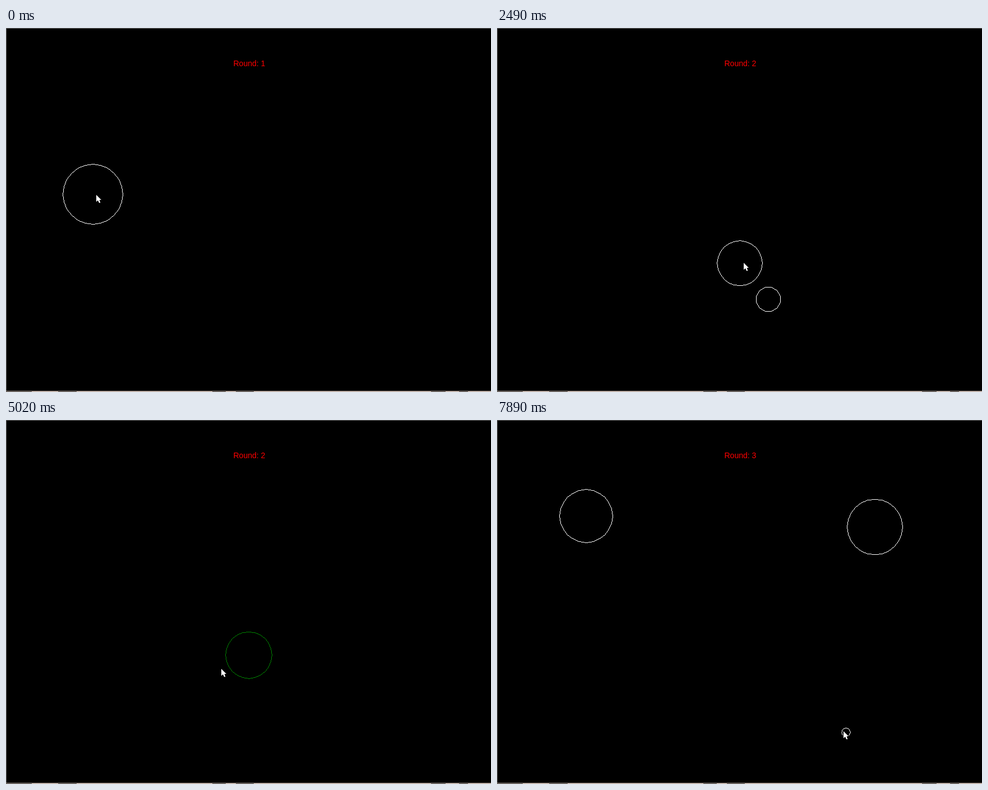
An HTML page with a canvas that plays this animation: 865 px wide and 648 px high, repeating every 8 s.

```html
<!DOCTYPE html>
<html lang="en">
<head>
<meta charset="utf-8">
<title>Circle game</title>
<style>
  html, body { margin: 0; width: 100%; height: 100%; overflow: hidden; background: #000; }
  canvas { display: block; }
</style>
</head>
<body>
<canvas id="stage" width="865" height="648"></canvas>
<script>
const LOOP = 8000, SIDES = 24;
const GROW = 0.048, FADE = 0.008, POP = 0.08, MAX_R = 75; // speeds in px per ms
const ROUND2 = 1980, ROUND3 = 5640;

// A ring grows while hovered, fades slowly otherwise, and collapses once popped
const rings = [
  { x: 155, y: 296, r: 53.5, born: 0, hovers: [[0, 880]], pop: 880 },
  { x: 433, y: 418.7, r: 44.1, born: ROUND2, hovers: [[2490, 2870], [4000, 4600]], pop: 4600 },
  { x: 484, y: 483, r: 26, born: ROUND2, hovers: [[2860, 3970]], pop: 3970 },
  { x: 159, y: 171, r: 56.1, born: ROUND3, hovers: [[6470, 6630]], pop: LOOP },
  { x: 674, y: 190.5, r: 26, born: ROUND3, hovers: [[6900, 7640]], pop: LOOP },
  { x: 622.4, y: 556, r: 21.7, born: ROUND3, hovers: [[7820, LOOP]], pop: LOOP },
];

// Pointer stops: [arrive, leave, x, y]
const stops = [
  [0, 800, 162, 297], [2050, 2490, 441, 418], [2860, 3970, 466, 479], [4200, 4600, 428, 425],
  [5020, 5020, 385, 443], [6400, 6600, 154, 172], [6920, 7600, 668, 190], [7820, LOOP, 619, 554],
];

// The picture refreshes about every 131 ms, in phase with these moments
const beats = [0, 1500, 2490, 3970, 5020, 6470, 7890, LOOP];

const ctx = document.getElementById("stage").getContext("2d");
const arrow = new Path2D("M0 0V12.5L3 9.8L5 14.2H7.4L5.6 9H9Z");

function refreshTime(t) {
  const i = beats.findIndex(b => b > t), from = beats[i - 1], span = beats[i] - from;
  const step = span / Math.round(span / 131);
  return from + Math.floor((t - from) / step + 1e-6) * step;
}

function radius({ r, born, hovers, pop }, t) {
  const dt = 10;
  for (let s = born; s < t; s += dt) {
    const d = Math.min(dt, t - s);
    if (s >= pop) r -= POP * d;
    else if (hovers.some(([a, b]) => s >= a && s < b)) r = Math.min(MAX_R, r + GROW * d);
    else r -= FADE * d;
  }
  return r;
}

function pointerAt(t) {
  const i = stops.findIndex(s => s[1] >= t), [arrive, , x, y] = stops[i];
  if (t >= arrive) return [x, y];
  const [, leave, x0, y0] = stops[i - 1];
  const u = (t - leave) / (arrive - leave), k = u * u * (3 - 2 * u);
  return [Math.round(x0 + (x - x0) * k), Math.round(y0 + (y - y0) * k)];
}

// One-pixel line without smoothing
function hardLine([x0, y0], [x1, y1]) {
  const n = Math.max(Math.abs(x1 - x0), Math.abs(y1 - y0), 1);
  for (let i = 0; i <= n; i++)
    ctx.fillRect(Math.round(x0 + (x1 - x0) * i / n), Math.round(y0 + (y1 - y0) * i / n), 1, 1);
}

function drawRing(ring, t) {
  const r = t < ring.born ? 0 : radius(ring, t);
  if (r <= 0) return;
  ctx.fillStyle = t < ring.pop ? "#fff" : "#008000";
  const corner = i => {
    const a = i * 2 * Math.PI / SIDES;
    return [Math.floor(ring.x + r * Math.sin(a)), Math.floor(ring.y - r * Math.cos(a))];
  };
  for (let i = 0; i < SIDES; i++) hardLine(corner(i), corner(i + 1));
}

function drawFrame() {
  ctx.fillStyle = "#000";
  ctx.fillRect(0, 0, 865, 648);
  ctx.fillStyle = "#666";
  ctx.fillRect(0, 0, 865, 1);
  ctx.fillRect(0, 0, 1, 646);
  ctx.fillStyle = "#bfb0a8";
  ctx.fillRect(0, 646, 865, 2);
  ctx.fillStyle = "#222";
  for (const [x, w] of [[0, 46], [93, 33], [368, 24], [410, 32], [758, 26], [808, 16]])
    ctx.fillRect(x, 647, w, 1);
}

function draw(now) {
  const t = refreshTime(now % LOOP);
  drawFrame();
  ctx.font = '14px "Liberation Sans", Arial, sans-serif';
  ctx.fillStyle = "#f00";
  ctx.fillText("Round: " + (t < ROUND2 ? 1 : t < ROUND3 ? 2 : 3), 405.5, 68);
  for (const ring of rings) drawRing(ring, t);

  const [x, y] = pointerAt(t);
  ctx.save();
  ctx.translate(x - 1, y);
  ctx.lineWidth = 2;
  ctx.strokeStyle = "#000";
  ctx.stroke(arrow);
  ctx.fillStyle = "#fff";
  ctx.fill(arrow);
  ctx.restore();
}

const start = performance.now();
(function tick() {
  draw(performance.now() - start);
  requestAnimationFrame(tick);
})();
</script>
</body>
</html>
```
